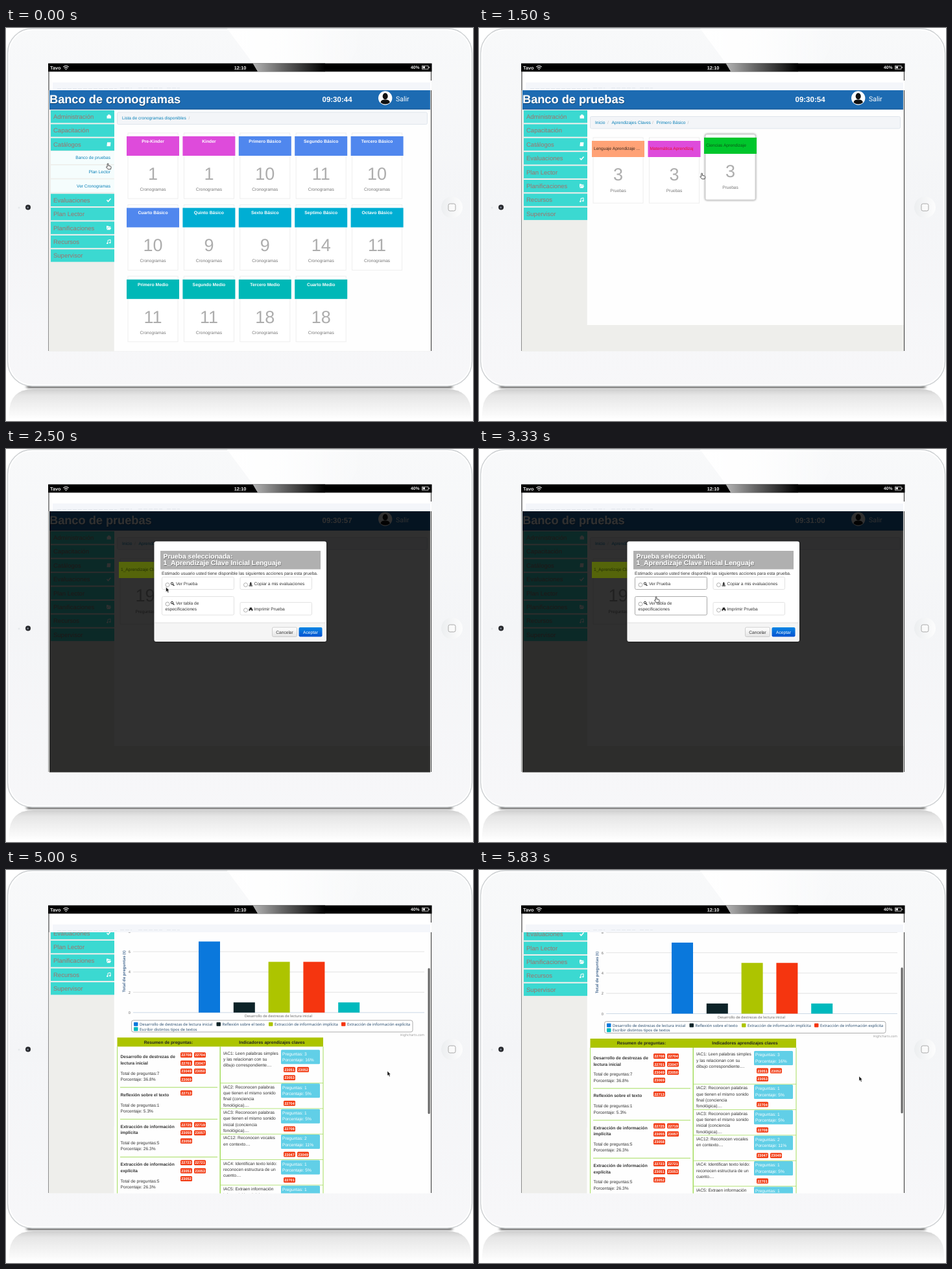
These frames come from a looping animation (720 by 606 pixels, 6000 ms). An HTML page:

```html
<!DOCTYPE html>
<html lang="es">
<head>
<meta charset="utf-8">
<title>Banco de pruebas</title>
<style>
html, body { margin: 0; width: 100%; height: 100%; overflow: hidden; background: #fff; }
svg { display: block; width: 720px; height: 606px; font-family: "Liberation Sans", Arial, sans-serif; text-rendering: geometricPrecision; }
.chart { font-family: "Noto Sans", sans-serif; }
</style>
</head>
<body>
<svg viewBox="0 0 720 606">
  <defs>
    <linearGradient id="body" x2="0" y2="1"><stop stop-color="#f8f9fa"/><stop offset=".5" stop-color="#f4f5f7"/><stop offset="1" stop-color="#f7f7f9"/></linearGradient>
    <linearGradient id="mirror" x2="0" y2="1"><stop stop-color="#cfcfcf"/><stop offset=".2" stop-color="#e6e6e6"/><stop offset=".65" stop-color="#f4f4f4"/><stop offset="1" stop-color="#fff"/></linearGradient>
    <linearGradient id="glare"><stop stop-color="#fff"/><stop offset=".4" stop-color="#fff" stop-opacity=".8"/><stop offset="1" stop-color="#fff" stop-opacity="0"/></linearGradient>
    <linearGradient id="barGlare"><stop stop-color="#b4b4b4"/><stop offset=".4" stop-color="#666"/><stop offset="1" stop-color="#000"/></linearGradient>
    <linearGradient id="home"><stop stop-color="#eceef0"/><stop offset="1" stop-color="#fdfdfd"/></linearGradient>
    <linearGradient id="plain" x2="0" y2="1"><stop stop-color="#fff"/><stop offset="1" stop-color="#e4e4e4"/></linearGradient>
    <linearGradient id="primary" x2="0" y2="1"><stop stop-color="#0a86e4"/><stop offset="1" stop-color="#0552d0"/></linearGradient>
    <filter id="soft" x="-20%" y="-20%" width="140%" height="140%"><feDropShadow dx="0" dy="0" stdDeviation="1.6" flood-opacity=".55"/></filter>
    <filter id="ink" x="-5%" y="-20%" width="110%" height="150%"><feDropShadow dx=".5" dy=".8" stdDeviation=".5" flood-opacity=".55"/></filter>
    <filter id="blur" x="-5%" y="-200%" width="110%" height="500%"><feGaussianBlur stdDeviation="2 1.3"/></filter>
    <clipPath id="view"><rect x="66" y="96" width="589" height="402.5"/></clipPath>
  </defs>
  <path d="M5 604V594Q5 557 42 557H680Q717 557 717 594V604Z" fill="url(#mirror)"/>
  <rect x="32" y="551" width="656" height="4.5" fill="#777" filter="url(#blur)"/>
  <rect x="2.5" y=".8" width="716" height="551.5" rx="38" fill="url(#body)" stroke="#cdd0d2" stroke-width="1.4"/>
  <rect x="4.5" y="2.8" width="712" height="547.5" rx="36" fill="none" stroke="#fff" stroke-width="1.5"/>
  <path d="M341 1H555L530 55H381Z" fill="url(#glare)"/>
  <circle cx="20" cy="277" r="1.5" fill="#e6e8ea"/>
  <circle cx="34" cy="276.5" r="4" fill="#26282c"/><circle cx="33.6" cy="276.8" r="1.5" fill="#737984"/>
  <circle cx="687.5" cy="276.5" r="16.5" fill="url(#home)"/>
  <rect x="682" y="271" width="11" height="11" rx="2.5" fill="#fafafa" stroke="#a9a9a9"/>
  <rect x="65.5" y="55" width="590.5" height="443.5" fill="#fff"/>
  <path d="M66 55V498M655.5 55V81M655.5 96V498" stroke="#444" stroke-width="1.2"/>
  <rect x="65" y="54.5" width="591.5" height="12.8" fill="#000"/>
  <path d="M380.5 54.5H492V67.3H388Z" fill="url(#barGlare)"/>
  <g fill="#eee" font-size="7.3" font-weight="bold">
    <text x="68" y="63.6">Tavo</text><text x="361" y="63.6" text-anchor="middle">12:10</text><text x="624" y="63.4" font-size="6.8">40%</text>
    <path d="M88.4 60Q92.5 56.4 96.6 60M90 62Q92.5 59.7 95 62" fill="none" stroke="#eee" stroke-width="1.1"/><circle cx="92.5" cy="63.6" r=".9"/>
    <rect x="641.5" y="58.3" width="9.5" height="5" fill="none" stroke="#ddd" stroke-width=".8"/><path d="M642.5 59.3h3.5v3h-3.5zM651.6 59.8h1.3v2h-1.3z"/>
  </g>
  <rect x="72" y="84" width="582" height="12" fill="#f4f6fa"/>
  <path d="M79 93.5h92M176 92.5h18M204 92.5h37M248 92.5h20" stroke="#e4e8ee" stroke-dasharray="6 2"/>
  <g id="app" clip-path="url(#view)"></g>
</svg>
<script>
const BODY = 6.63, STEP = 1000 / 6, STEPS = 36;
const LIME = '#acc400', LINK = '#0a80b8';

const rect = (x, y, w, h, fill, more = '') => `<rect x="${x}" y="${y}" width="${w}" height="${h}" fill="${fill}" ${more}/>`;
const text = (x, y, str, fill = '#333', size = BODY, more = '') => `<text x="${x}" y="${y}" fill="${fill}" font-size="${size}" ${more}>${str}</text>`;
const line = (d, color, width = 1) => `<path d="${d}" fill="none" stroke="${color}" stroke-width="${width}"/>`;
const group = (content, more) => `<g ${more}>${content}</g>`;
const MID = 'text-anchor="middle"', END = 'text-anchor="end"', BOLD = 'font-weight="bold"';

// Linear value between [step, value] keys
function at(keys, k) {
  const i = keys.findIndex(key => key[0] > k);
  if (i < 0) return keys[keys.length - 1][1];
  const [k0, v0] = keys[i - 1], [k1, v1] = keys[i];
  return v0 + (v1 - v0) * (k - k0) / (k1 - k0);
}

const cursorX = [[0, 157], [4, 141], [6, 141], [8, 366], [9, 343.5], [11, 236], [13, 236], [16, 252], [18, 266], [20, 273], [22, 274], [25, 462], [27, 462], [30, 588], [32, 588], [35, 586]];
const cursorY = [[0, 209], [4, 196], [6, 196], [8, 221], [9, 224], [11, 223], [13, 223], [16, 208], [18, 206], [20, 228], [22, 233], [25, 280], [27, 280], [30, 310], [32, 310], [35, 318]];
const seconds = [[0, 44], [4, 48], [5, 48], [9, 54], [13, 57], [20, 60], [27, 68], [35, 76]];
const scrolling = [[0, 0], [29, 0], [32, 311], [33, 311], [35, 102]];

function clock(k) {
  const s = Math.floor(at(seconds, k) + 1e-6);
  return `09:${30 + Math.floor(s / 60)}:${String(s % 60).padStart(2, '0')}`;
}

function header(title, k) {
  return rect(67, 96, 587, 29.5, '#1d6bb2') + rect(67, 124, 587, 1.5, '#185d9e')
    + text(67, 116, title, '#fff', 18.2, BOLD + ' filter="url(#ink)"')
    + text(487.5, 114, clock(k), '#fff', 11.5, BOLD)
    + '<circle cx="584.7" cy="108" r="10.7" fill="#fff"/><path d="M577.5 115q.5-4.200 5-4.500h4.400q4.500.3 5 4.500q-7.200 5-14.400 0z" fill="#111"/><ellipse cx="584.7" cy="105.300" rx="4" ry="5" fill="#111"/>'
    + text(601, 112.8, 'Salir', '#fff', 10.5, 'font-family="Roboto, sans-serif"');
}

const MENU = ['Administración', 'Capacitación', 'Catálogos', 'Evaluaciones', 'Plan Lector', 'Planificaciones', 'Recursos', 'Supervisor'];
const ICONS = {
  0: '<path d="M155.500 8h6.500v4.500h-6.500zM157 6.500h3.500v1.500h-3.500z"/>',
  2: '<path d="M156 6.500h5.500l-.6 6h-5.500z"/>',
  3: '<path d="M155.500 9.600l2 2.200 4-4.600" fill="none" stroke="#fff" stroke-width="1.500"/>',
  5: '<path d="M155 12.500v-6h2.500l.8 1h3v1.500h-4.500zM155.500 12.800l1.800-3.200h5l-1.800 3.200z"/>',
  6: '<path d="M157 12v-4.500l4-1v4.500" fill="none" stroke="#fff"/><circle cx="156.300" cy="12" r="1.200"/><circle cx="160.300" cy="11.200" r="1.200"/>'
};

function sidebar(open, k) {
  let out = rect(66, 126, 100.500, 900, '#eeeeeb');
  MENU.forEach((name, i) => {
    const y = 127 + i * 21.4 + (open && i > 2 ? 64.500 : 0);
    out += rect(69, y, 98, 19.3, '#3bd9d1') + text(73, y + 13, name, '#a0716c', 9.5);
    if (ICONS[i]) out += group(ICONS[i], `fill="#fff" transform="translate(0 ${y})"`);
  });
  if (open) ['Banco de pruebas', 'Plan Lector', 'Ver Cronogramas'].forEach((name, i) => {
    const y = 190 + i * 21.700;
    out += rect(69, y, 98, 20, k > 1 && i === 0 ? '#e2f4f5' : '#f5fdfd') + text(161, y + 12.2, name, LINK, BODY, END);
  });
  return out;
}

function crumbs(y, parts) {
  return rect(171.5, y, 478, 18.500, '#f3f5f8', 'stroke="#dfe5ec" rx="2"')
    + parts.map(([x, str], i) => text(x, y + 11.2, str, LINK) + (i < parts.length - 1 ? text(parts[i + 1][0] - 6.500, y + 11.2, '/', '#bbb') : '')).join('');
}

// A count card; (x, y) is the corner of the coloured label
function card(x, y, h, color, label, count, unit, hover) {
  const up = hover ? -5 : 0, mid = x + 40.5;
  return group(rect(x + 2, y - 5, 77, 101, '#fff', hover ? 'rx="2" stroke="#ccc" filter="url(#soft)"' : 'stroke="#eee"')
    + rect(x, y, 81, h, color) + label
    + text(mid, y + (h > 25 ? 67 : 61), count, '#adadad', 27, MID)
    + text(mid, y + (h > 25 ? 84 : 79), unit, '#777', BODY, MID), `transform="translate(0 ${up})"`);
}

const COURSES = ['Pre-Kinder', 'Kinder', 'Primero Básico', 'Segundo Básico', 'Tercero Básico', 'Cuarto Básico', 'Quinto Básico', 'Sexto Básico', 'Septimo Básico', 'Octavo Básico', 'Primero Medio', 'Segundo Medio', 'Tercero Medio', 'Cuarto Medio'];
const COUNTS = [1, 1, 10, 11, 10, 10, 9, 9, 14, 11, 11, 11, 18, 18];
const courseColor = i => i < 2 ? '#de4bdb' : i < 6 ? '#5087ee' : i < 10 ? '#00aed3' : '#00b8b7';

function courses(x0, y0, h, unit, counts, hover) {
  return COURSES.map((name, i) => {
    const x = x0 + i % 5 * 86.4, y = y0 + Math.floor(i / 5) * 110.400;
    return card(x, y, h, courseColor(i), text(x + 40.5, y + 10, name, '#fff', 6.8, BOLD + MID.padStart(21)), counts[i], unit, i === hover);
  }).join('');
}

function row(items, unit, hover) {
  return items.map(([name, count, color, ink], i) => {
    const x = 174 + i * 86.5;
    return card(x, 174, 25, color, text(x + 3, 188, name, ink), count, unit, i === hover);
  }).join('');
}

const SUBJECTS = [['Lenguaje Aprendizaje ...', 3, '#ffa276', '#3a2a20'], ['Matemática Aprendizaj', 3, '#de4bdb', '#e8102c'], ['Ciencias Aprendizaje', 3, '#00c62c', '#0a5a18']];
const TESTS = [['1_Aprendizaje Clave', 19, '#8fe800', '#2c4a00'], ['2_Aprendizaje Clave I', 13, '#8fe800', '#2c4a00'], ['3_Aprendizaje Clave F', 19, '#8fe800', '#2c4a00']];
const TRAIL = [[179, 'Inicio'], [204.5, 'Aprendizajes Claves'], [273.5, 'Primero Básico'], [327, 'Lenguaje Aprendizaje Clave']];

function page(title, k, content, open = false, bottom = 498) {
  return rect(66, 96, 589, 403, '#eeeeeb') + rect(166.5, 126, 488, bottom - 126, '#fefefe') + sidebar(open, k) + header(title, k) + content;
}

function option(x, y, w, h, icon, lines, strong, checked) {
  const ry = h > 25 ? y + 11.500 : y + 12;
  return rect(x, y, w, h, '#fff', `rx="2" stroke="${strong ? '#aaa' : '#e2e2e2'}"`)
    + `<circle cx="${x + 8.5}" cy="${ry}" r="3" fill="#fff" stroke="#999" stroke-width=".8"/>`
    + (checked ? `<circle cx="${x + 8.5}" cy="${ry}" r="1.4" fill="#333"/>` : '')
    + group(icon, `transform="translate(${x + 13.5} ${ry - 4})" fill="#222"`)
    + text(x + 21.500, ry + .6, lines[0]) + (lines[1] ? text(x + 5, ry + 9.6, lines[1]) : '');
}

function modal(k) {
  const lens = '<circle cx="2" cy="2" r="1.700" fill="none" stroke="#222"/><path d="M3.200 3.200l2.200 2.200" stroke="#222" stroke-width="1.300"/>';
  const down = '<path d="M1.800 0h2v2.500h1.500l-2.500 2.200-2.500-2.200h1.500zM0 4.700h5.600v1.300h-5.600z"/>';
  const printer = '<path d="M1.200 0h3.400v2h1.200v3h-5.800v-3h1.200z"/><path d="M1.500 3.500h2.800v2h-2.800z" fill="#ddd"/>';
  return rect(228.5, 142.5, 265.5, 154.500, '#fff', 'rx="3" filter="url(#soft)"')
    + rect(238, 157, 247, 28.500, '#b0b0b0')
    + group(text(242.500, 169, 'Prueba seleccionada:', '#fff', 10.4, BOLD) + text(242.5, 178.700, '1_Aprendizaje Clave Inicial Lenguaje', '#fff', 10.4, BOLD), 'filter="url(#ink)"')
    + text(240, 194.2, 'Estimado usuario usted tiene disponible las siguientes acciones para esta prueba.')
    + option(240.500, 197.5, 111, 19, lens, ['Ver Prueba'], k > 15)
    + option(361, 197.5, 110.500, 19, down, ['Copiar a mis evaluaciones'])
    + option(240.5, 227.5, 111, 28.5, lens, ['Ver tabla de', 'especificaciones'], k > 18, k > 21)
    + option(361, 236.500, 110.5, 19.5, printer, ['Imprimir Prueba'])
    + rect(229, 268, 264.500, 28.5, '#f5f5f5', 'rx="3"') + line('M229 268H493.500', '#ddd')
    + rect(410.5, 275, 38, 14.500, 'url(#plain)', 'rx="2" stroke="#c4c4c4" stroke-width=".8"') + text(429.5, 284.5, 'Cancelar', '#333', BODY, MID)
    + rect(451.500, 275, 36, 14.5, 'url(#primary)', 'rx="2"') + text(469.5, 284.5, 'Aceptar', '#fff', BODY, MID);
}

const SKILLS = [
  [['Desarrollo de destrezas de', 'lectura inicial'], 7, '36.8', '22708 22704 22701 23047 23049 23050 23069', '#0a78dc'],
  [['Reflexión sobre el texto'], 1, '5.3', '22713', '#0d2328'],
  [['Extracción de información', 'implícita'], 5, '26.3', '22725 22719 23055 23057 23058', '#adc400'],
  [['Extracción de información', 'explícita'], 5, '26.3', '22723 22721 23051 23053 23052', '#f5350f'],
  [['Escribir distintos tipos de', 'textos'], 1, '5.3', '23059', '#00b9bd']
];
const MARKS = [
  ['IAC1: Leen palabras simples|y las relacionan con su|dibujo correspondiente....', 3, 16, '23051 23052 23053'],
  ['IAC2: Reconocen palabras|que tienen el mismo sonido|final (conciencia|fonológica)....', 1, 5, '22704'],
  ['IAC3: Reconocen palabras|que tienen el mismo sonido|inicial (conciencia|fonológica)....', 1, 5, '22708'],
  ['IAC12: Reconocen vocales|en contexto....', 2, 11, '23047 23049'],
  ['IAC4: Identifican texto leído:|reconocen estructura de un|cuento....', 1, 5, '22701'],
  ['IAC5: Extraen información|inferencial local del texto:|reconoce motivación de|personajes....', 1, 5, '22704'],
  ['IAC9: Extraen información|inferencial local del texto:|identifica problema–|solución....', 1, 5, '22708'],
  ['IAC6: Extraen información|inferencial local del texto:|identifica problema–|solución....', 1, 5, '22723'],
  ['IAC7: Extraen información|literal compleja del texto:|identifica secuencia de|acciones....', 2, 11, '22713 22715'],
  ['IAC8: Extraen información|literal simple del texto:|identifica lugar....', 1, 5, '22721'],
  ['IAC10: Extrae información|literal simple del texto:|identifica ambiente....', 1, 5, '22725']
];

const badges = (x, y, codes) => codes.split(' ').map((code, i) => {
  const bx = x + i % 2 * 21, by = y + Math.floor(i / 2) * 12.4;
  return rect(bx, by, 18, 8, '#f23a12', 'rx="1.5"') + text(bx + 9, by + 6.1, code, '#fff', 5.6, BOLD + ' ' + MID);
}).join('');

function chart() {
  const zero = 323.5, unit = 15.65;
  let out = '';
  for (let v = 0; v <= 8; v += 2) {
    const y = zero - v * unit;
    out += line(`M196 ${y}H645`, v ? '#dcdcdc' : '#c0d0e0', .8) + text(192, y + 2, v, '#666', 5.6, END);
  }
  SKILLS.forEach((s, i) => out += rect(297 + i * 53.8, zero - s[1] * unit, 33, s[1] * unit, s[4]));
  out += text(0, 0, 'Total de preguntas (t)', '#4d6f95', 6, `${BOLD} ${MID} transform="translate(184 260) rotate(-90)"`)
    + text(420, 330.500, 'Desarrollo de destrezas de lectura inicial', '#666', 5.5, MID)
    + rect(193.5, 335.5, 433.5, 18, '#fff', 'rx="3" stroke="#999" stroke-width=".8"');
  [[197, 341.500], [324.5, 341.5], [405, 341.5], [517, 341.5], [197, 349]].forEach(([x, y], i) => {
    out += rect(x, y - 3, 6.5, 6, SKILLS[i][4], 'rx="1"') + text(x + 9, y + 2.2, SKILLS[i][0].join(' '), '#274b6d', 5.95);
  });
  return group(out + text(645, 359.500, 'Highcharts.com', '#999', 5, END), 'class="chart"');
}

function tables() {
  let out = rect(171.5, 362, 158.5, 14, LIME) + rect(330, 362, 159, 14, LIME)
    + text(250.5, 371.4, 'Resumen de preguntas:', '#222', BODY, BOLD + ' ' + MID)
    + text(410, 371.4, 'Indicadores aprendizajes claves', '#222', BODY, BOLD + ' ' + MID);
  const edge = '#a5dd5e';
  let y = 394;
  for (const [name, total, share, codes] of SKILLS) {
    const extra = (name.length - 1) * 9.3;
    name.forEach((str, i) => out += text(176.5, y + i * 9.6, str, '#333', BODY, BOLD));
    out += text(176.5, y + 16 + extra, 'Total de preguntas:' + total) + text(176.5, y + 25.3 + extra, `Porcentaje: ${share}%`)
      + badges(269, y - 9, codes) + line(`M176 ${y + 35.5 + extra}H326`, edge);
    y += 49.100 + extra;
  }
  out += line('M171.500 376V668H330V376', edge) + line('M330.500 376V900M489 376V900', edge);
  MARKS.forEach(([words, total, share, codes], i) => {
    const top = i ? 433 + (i - 1) * 39.35 : 381;
    if (i) out += line(`M331 ${top - .8}H489`, edge, .8);
    words.split('|').forEach((str, n) => out += text(335, top + 7.2 + n * 9.4, str));
    out += rect(424, top, 60, 22, '#61cfe7', 'rx="1.500"')
      + text(426, top + 8.4, 'Preguntas: ' + total, '#fff') + text(426, top + 17.7, `Porcentaje: ${share}%`, '#fff')
      + badges(428, top + 26.500, codes);
  });
  return out;
}

function report(k) {
  const scroll = at(scrolling, k);
  const content = page('Banco de pruebas', k, chart() + tables(), false, 1000);
  return group(content, `transform="translate(0 ${-scroll})"`)
    + (k > 28 ? rect(650.500, 98 + scroll * .513, 3.2, 225, '#666', 'rx="1.600"') : '');
}

function pointer(k) {
  const hand = k < 12 || (k > 15 && k < 25);
  const shape = hand
    ? '<path d="M-.800 4.500V.8a.9.9 0 0 1 1.800 0V3.400l3.200.7q1 .4.9 1.500l-.6 3.200H.2L-2.500 5.500q.2-1.400 1.700-.3z" fill="#fff" stroke="#222" stroke-width=".8"/>'
    : '<path d="M0 0V7.200L1.700 5.800 2.900 8.600 4.200 8 3 5.300H5z" fill="#111" stroke="#fff" stroke-width=".4"/>';
  return group(shape, `transform="translate(${at(cursorX, k)} ${at(cursorY, k)})"`);
}

function scene(k) {
  const hover = Math.floor((at(cursorX, k) - 170) / 86.4);
  if (k < 6) return page('Banco de cronogramas', k, crumbs(130, [[179, 'Lista de cronogramas disponibles'], [288, '']]) + courses(186, 167, 30, 'Cronogramas', COUNTS), true);
  if (k < 9) return page('Banco de pruebas', k, crumbs(136.5, TRAIL.slice(0, 2)) + courses(174, 174, 25, 'Pruebas', COUNTS.map(() => 3), hover));
  if (k < 12) return page('Banco de pruebas', k, crumbs(136.5, [...TRAIL.slice(0, 3), [328, '']]) + row(SUBJECTS, 'Pruebas', hover), false, 458);
  if (k < 26) {
    const shown = k > 13, dim = k < 13 ? 0 : shown ? .81 : .36;
    return page('Banco de pruebas', k, crumbs(136.5, TRAIL) + row(TESTS, 'Preguntas', shown ? -1 : 0), false, 458)
      + rect(67, 96, 587, 403, '#000', `opacity="${dim}"`)
      + (shown ? rect(174, 174, 81, 25, '#55650a') + text(177, 188, TESTS[0][0], '#222d05') + modal(k) : '');
  }
  return k === 26 ? rect(66, 96, 588.500, 403, '#fefefd') : report(k);
}

const app = document.getElementById('app');
let shownStep = -1;
function tick() {
  const k = Math.floor((performance.now() % 6000 + 6.7) / STEP) % STEPS;
  if (k !== shownStep) {
    shownStep = k;
    app.innerHTML = scene(k) + pointer(k);
  }
  requestAnimationFrame(tick);
}
tick();
</script>
</body>
</html>
```
